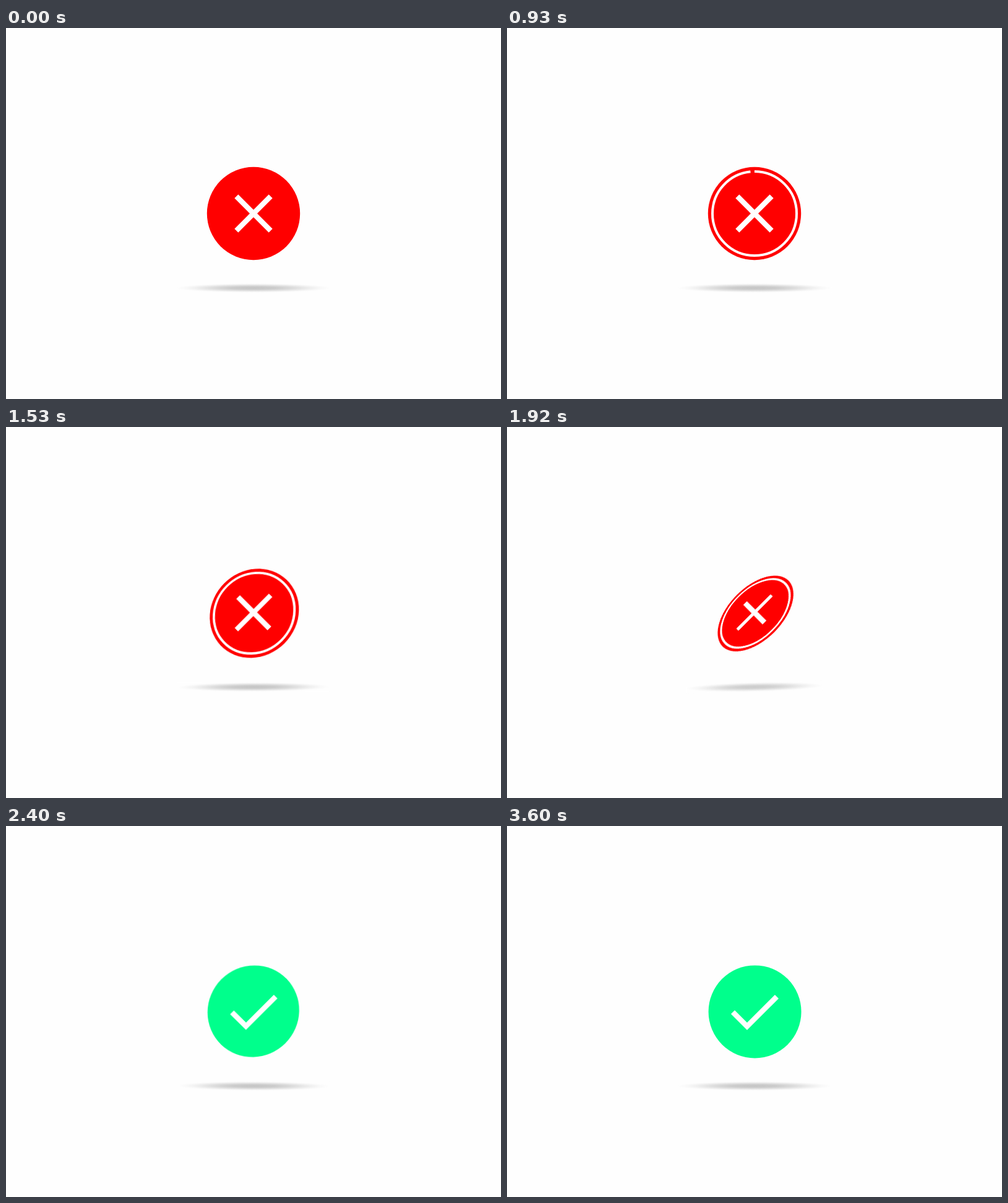
Animation of 800 by 600 pixels, one loop 4.44 s. Source, as an HTML page:

```html
<!DOCTYPE html>
<html lang="en">
<head>
<meta charset="utf-8">
<title>Status flip</title>
<style>
  html, body {
    margin: 0;
    width: 100%;
    height: 100%;
    overflow: hidden;
    background: #fefefe;
  }
  .stage {
    position: relative;
    width: 800px;
    height: 600px;
    overflow: hidden;
    --loop: 4440ms;
  }
  .shadow {
    position: absolute;
    left: 275px;
    top: 413px;
    width: 250px;
    height: 15px;
    background: radial-gradient(closest-side,
      #c5c5c5 0%, #cbcbcb 28%, #dcdcdc 52%, #efefef 74%, #f9f9f9 88%, #fefefe 100%);
    animation: sway var(--loop) infinite;
  }
  .drop {
    position: absolute;
    left: 320px;
    top: 220px;
    width: 160px;
    height: 160px;
    perspective: 1111px;
    animation: dip var(--loop) infinite;
  }
  .coin {
    width: 100%;
    height: 100%;
    transform-style: preserve-3d;
    animation: flip var(--loop) infinite;
  }
  .face {
    position: absolute;
    inset: 0;
    width: 160px;
    height: 160px;
    backface-visibility: hidden;
  }
  .back { transform: rotate3d(1, -1, 0, 180deg); }
  .mark { fill: none; stroke: #fff; stroke-width: 8.5; }
  .soft { filter: blur(.5px); }
  .ring {
    fill: none;
    stroke: #fff;
    stroke-width: 4;
    stroke-dasharray: 100 101;
    filter: blur(.7px);
    animation: trace var(--loop) infinite;
  }

  /* ring closes at 1005 ms */
  @keyframes trace {
    0% { stroke-dashoffset: 100; animation-timing-function: cubic-bezier(.333, 0, .667, 1); }
    22.64%, 100% { stroke-dashoffset: 0; }
  }
  /* press down and return, 1080 to 1500 ms */
  @keyframes dip {
    0%, 24.32% { transform: translateY(0); animation-timing-function: cubic-bezier(.333, 0, .667, 1); }
    28.38% { transform: translateY(11px); animation-timing-function: cubic-bezier(.333, 0, .667, 1); }
    33.78%, 100% { transform: translateY(0); }
  }
  /* slow wind-up, fast turn, gentle settle, 780 to 3000 ms */
  @keyframes flip {
    0%, 17.57% { transform: rotate3d(1, -1, 0, 0deg); animation-timing-function: cubic-bezier(.333, 0, .667, .333); }
    43.24% { transform: rotate3d(1, -1, 0, 55.4deg); animation-timing-function: cubic-bezier(.4, .17, .6, .92); }
    54.05% { transform: rotate3d(1, -1, 0, 167deg); animation-timing-function: cubic-bezier(.333, .667, .667, 1); }
    67.57%, 100% { transform: rotate3d(1, -1, 0, 180deg); }
  }
  @keyframes sway {
    0%, 17.57% { transform: none; opacity: 1; animation-timing-function: ease-in; }
    34.46% { transform: rotate(-.2deg) scaleX(.985); opacity: 1; animation-timing-function: ease-in; }
    43.24% { transform: rotate(-1.3deg) scaleX(.88); opacity: .88; animation-timing-function: ease-out; }
    46.85% { transform: rotate(0deg) scaleX(.85); opacity: .85; animation-timing-function: ease-in-out; }
    54.05% { transform: rotate(.2deg) scaleX(.985); opacity: 1; animation-timing-function: ease-out; }
    67.57%, 100% { transform: none; opacity: 1; }
  }
</style>
</head>
<body>
<div class="stage">
  <div class="shadow"></div>
  <div class="drop">
    <div class="coin">
      <svg class="face" viewBox="-80 -80 160 160">
        <circle r="75.2" fill="#f00"/>
        <circle class="ring" r="68" pathLength="100" transform="rotate(-90)"/>
        <path class="mark" d="M-27.7-27.7 27.7 27.7M27.7-27.7-27.7 27.7"/>
      </svg>
      <svg class="face back" viewBox="-80 -80 160 160">
        <circle class="soft" cx=".6" cy=".4" r="75" fill="#00ff8c"/>
        <path class="mark" d="M-35 1-12 24 36-24"/>
      </svg>
    </div>
  </div>
</div>
</body>
</html>
```
